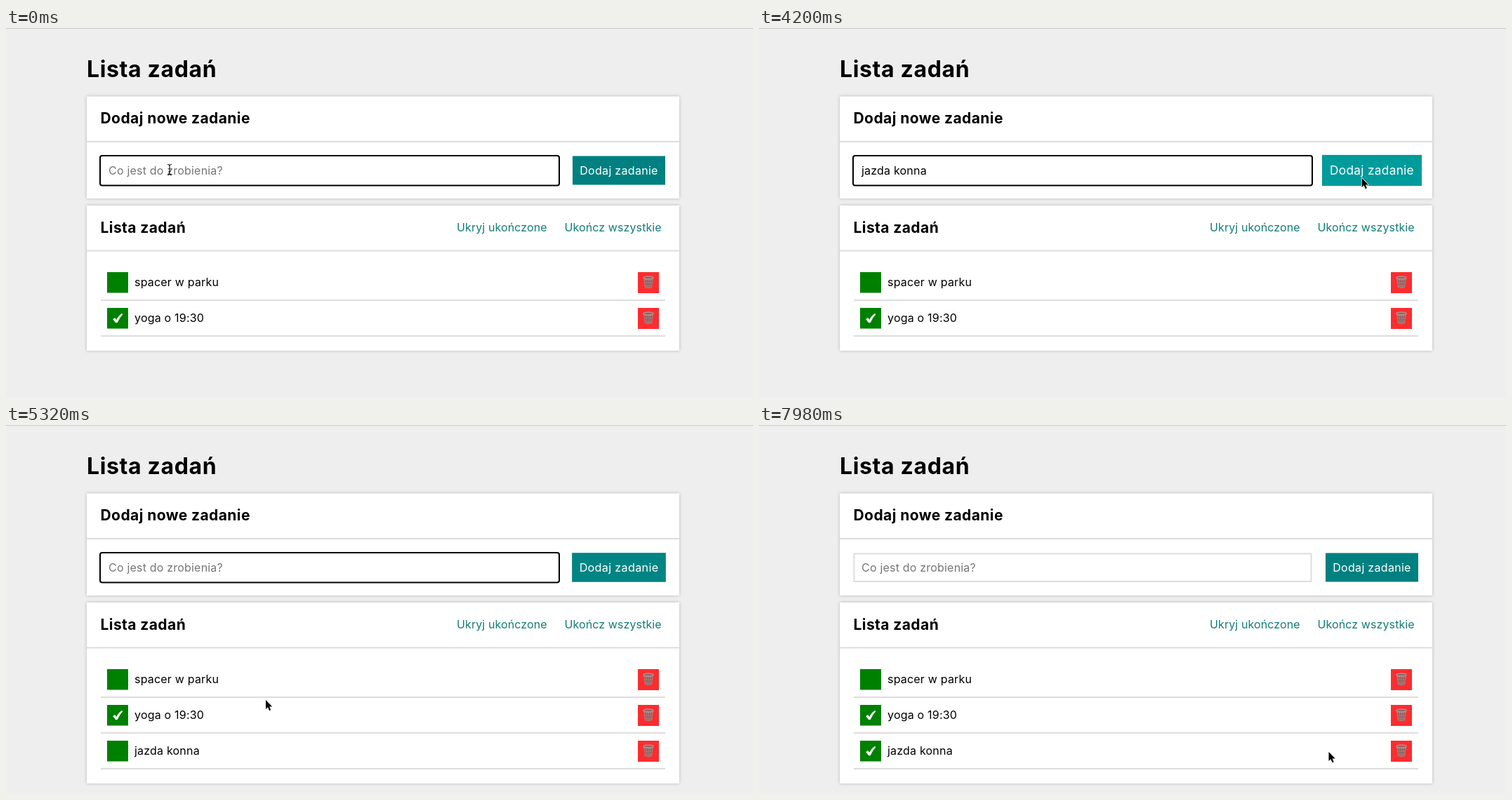
Animation of 1064 by 526 pixels, one loop 8 s. Source, as an HTML page:

```html
<!DOCTYPE html>
<html lang="pl">
<head>
<meta charset="utf-8">
<title>Lista zadań</title>
<style>
  html, body { margin: 0; width: 100%; height: 100%; overflow: hidden; background: #eee; }
  svg { display: block; width: 1064px; height: 526px; }
  text { font: 16px Inter, "Open Sans", sans-serif; letter-spacing: .2px; white-space: pre; }
  .h1, .h2 { font-weight: 700; letter-spacing: .02em; }
  .h1 { font-size: 32px; }
  .h2 { font-size: 21px; }
  .link { fill: #137c78; letter-spacing: .1px; }
  .card { fill: #fff; filter: drop-shadow(0 0 2px #b4b4b4); }
  .line { fill: #ddd; }
</style>
</head>
<body>
<svg viewBox="0 0 1064 526">
  <defs>
    <path id="tick" d="M-6.8 1.2 L-3.8 -.6 L-1.8 2.2 Q1.5 -4 6 -6.6 L7.4 -5.6 Q3 -1 -.3 6.2 Q-1.5 7 -3 6.2 Z" fill="#fff"/>
    <g id="bin">
      <rect width="30" height="30" fill="#fd2c2f"/>
      <path d="M8 8 L10 22 Q15 24 20 22 L22 8 Z" fill="#a9827f"/>
      <path d="M10.5 10 L12 22 M13.5 10 L14 22 M16.5 10 L16 22 M19.5 10 L18 22 M9 13 H21 M9.5 17 H20.5" stroke="#8b5553" stroke-width=".8"/>
      <ellipse cx="15" cy="8" rx="7.5" ry="2" fill="#8d6a68" stroke="#bda4a2"/>
    </g>
  </defs>

  <rect width="1064" height="1" fill="#c8c8c8"/>
  <text class="h1" x="115" y="70">Lista zadań</text>

  <rect class="card" x="115" y="97.5" width="844" height="145.5"/>
  <rect class="line" x="115" y="161" width="844" height="2"/>
  <text class="h2" x="134.5" y="136">Dodaj nowe zadanie</text>
  <rect id="field" fill="#fff" stroke-width="2"/>
  <text id="entry" x="146" y="208.5"></text>
  <rect id="caret" y="194" width="1" height="18"/>
  <g id="button">
    <rect x="-66" y="-20.5" width="132" height="41"/>
    <text y="5.5" text-anchor="middle" fill="#fff" style="letter-spacing:.3px">Dodaj zadanie</text>
  </g>

  <rect id="list" class="card" x="115" y="253" width="844"/>
  <rect class="line" x="115" y="316.5" width="844" height="2"/>
  <text class="h2" x="134.5" y="292">Lista zadań</text>
  <text class="link" x="642" y="290">Ukryj ukończone</text>
  <text class="link" x="795.5" y="290">Ukończ wszystkie</text>
  <g id="rows"></g>

  <path id="beam" d="M-3 -7.5 Q0 -7.5 0 -5.5 Q0 -7.5 3 -7.5 M0 -5.5 V5.5 M-3 7.5 Q0 7.5 0 5.5 Q0 7.5 3 7.5 M-1.5 2.5 H1.5"
    fill="none" stroke="#111" stroke-width="1.2"/>
  <path id="arrow" d="M0 0 V13 L3 10.3 L5 15.2 L7.2 14.3 L5.1 9.5 H9.2 Z"
    stroke="#fff" stroke-width="1.6" paint-order="stroke" stroke-linejoin="round"/>
</svg>
<script>
const LOOP = 8000, STEP = 70;
const PHRASE = "jazda konna";
const KEYS = [70, 350, 560, 840, 1050, 1190, 1610, 1820, 2100, 2310, 2520];
const BLUR = 4480, SUBMIT = 4690, CHECK = 6440;

// pointer path: time, x, y
const PATH = [
  [3360, 234, 202], [3570, 443, 202], [3850, 690, 205], [3990, 815, 211], [4130, 858, 214],
  [4550, 862, 214], [4900, 861, 215], [5040, 842, 226], [5180, 620, 308], [5320, 370, 392],
  [5530, 235, 438], [5810, 168, 460], [6020, 160, 466], [6230, 157, 467], [6370, 157, 468],
  [6790, 160, 470], [6930, 215, 473], [7140, 437, 471], [7350, 620, 470], [7600, 745, 468],
  [7980, 811.5, 466]
];

const $ = id => document.getElementById(id);
const set = (el, attrs) => { for (const k in attrs) el.setAttribute(k, attrs[k]); };
const show = (el, on) => { el.style.display = on ? "" : "none"; };

$("rows").innerHTML = ["spacer w parku", "yoga o 19:30", PHRASE].map((label, i) => `
  <g transform="translate(0 ${348 + 51 * i})">
    <rect class="box" x="144" width="30" height="29.5" fill="#008000"/>
    <use class="tick" href="#tick" x="159" y="14.7"/>
    <text x="183" y="19.5">${label}</text>
    <use href="#bin" x="900"/>
    <rect class="line" x="135" y="39" width="804" height="2"/>
  </g>`).join("");
const rows = $("rows").children;
const ticks = document.querySelectorAll(".tick");
const newBox = document.querySelectorAll(".box")[2];
show(ticks[0], false);

const easeOut = x => 1 - (1 - Math.min(1, Math.max(0, x))) ** 2.5;
const hover = (t, enter, leave, time) => easeOut((t - enter) / time) - easeOut((t - leave) / time);

function pointerAt(t) {
  const i = PATH.findIndex(p => p[0] > t);
  if (i === 0) return [233, 202];
  if (i < 0) return PATH[PATH.length - 1].slice(1);
  const [t0, x0, y0] = PATH[i - 1], [t1, x1, y1] = PATH[i];
  const k = (t - t0) / (t1 - t0);
  return [x0 + (x1 - x0) * k, y0 + (y1 - y0) * k];
}

function caretOn(t) {
  if (t < KEYS[0] || (t >= BLUR && t < SUBMIT) || t >= 6370) return false;
  if (t < 2520) return true;
  return Math.floor((t - (t < BLUR ? 2520 : SUBMIT)) / 490) % 2 === 0;
}

function draw(t) {
  const sent = t >= SUBMIT;
  const typed = sent ? "" : PHRASE.slice(0, KEYS.filter(k => k <= t).length);
  const entry = $("entry");
  entry.textContent = typed || "Co jest do zrobienia?";
  set(entry, { fill: typed ? "#000" : "#757575" });

  const focused = t < BLUR || (sent && t < 6370);
  set($("field"), focused
    ? { x: 134, y: 182, width: 654, height: 42.5, rx: 3, stroke: "#000" }
    : { x: 135.5, y: 183.5, width: 651, height: 39.5, rx: 0, stroke: "#ddd" });
  show($("caret"), caretOn(t));
  set($("caret"), { x: 146 + (typed ? entry.getComputedTextLength() - .5 : 0) });

  const lift = hover(t, 3980, 5040, 500);
  const teal = 128 + 35 * lift;
  set($("button"), {
    transform: `translate(873 203) scale(${1 + .1 * lift})`,
    fill: `rgb(0,${teal},${teal})`
  });

  set($("list"), { height: sent ? 258 : 207 });
  show(rows[2], sent);
  show(ticks[2], t >= CHECK);
  set(newBox, { fill: `rgb(0,${128 + 25 * hover(t, 5810, 6860, 300)},0)` });

  const [x, y] = pointerAt(t);
  const visible = t < 140 || t >= 3360;
  const inField = x > 134 && x < 788 && y > 182 && y < 224;
  for (const [id, on] of [["beam", inField], ["arrow", !inField]]) {
    show($(id), visible && on);
    set($(id), { transform: `translate(${x} ${y})` });
  }
}

const start = performance.now();
function tick() {
  const t = (performance.now() - start) % LOOP;
  draw(Math.floor(t / STEP) * STEP);
  requestAnimationFrame(tick);
}
tick();
</script>
</body>
</html>
```
